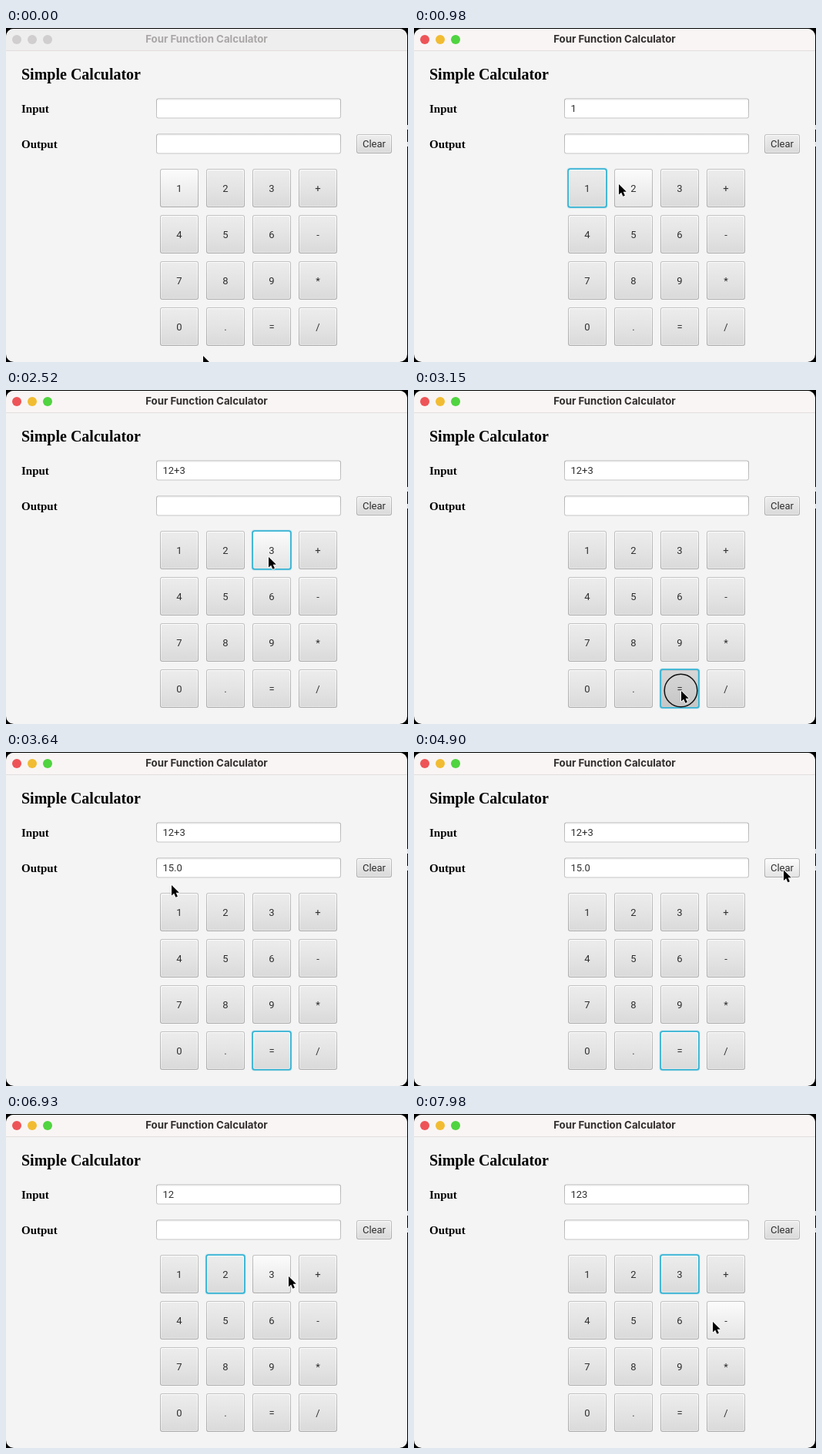
An HTML page that plays this animation: 522 by 434 pixels, repeating every 8 s.

```html
<!DOCTYPE html>
<html lang="en">
<head>
<meta charset="utf-8">
<title>Calculator</title>
<style>
  html, body { margin: 0; width: 100%; height: 100%; overflow: hidden; background: #000; }
  svg { display: block; width: 522px; height: 434px; }
  text { font: 13px Roboto, sans-serif; fill: #2f2f2f; }
  .title { font: 700 13.25px Inter, sans-serif; fill: #322e2e; }
  .serif { font: 700 15px "Liberation Serif", serif; fill: #000; }
  .heading { font-size: 20px; }
  .mid { text-anchor: middle; }
  .bar { fill: #f9f5f4; }
  .inactive .bar { fill: #efeeee; }
  .inactive .title { fill: #a9a6a6; }
  .inactive .light { fill: #d0cece; }
  .glow, .focus { fill: none; }
  .edge { fill: url(#edge); }
  .rim { fill: url(#rim); }
  .face { fill: url(#face); }
  .hover .face { fill: url(#faceHover); }
  .press .face { fill: url(#facePress); }
  .press .rim { fill: #c9c9c9; }
  .focused .glow { fill: #039ed3; fill-opacity: .12; }
  .focused .focus { fill: #35b3d3; }
</style>
</head>
<body>
<svg id="stage" viewBox="0 0 522 434">
  <defs id="defs"></defs>
  <rect width="522" height="434"/>
  <path d="M521.5 126v6m0 16v6" stroke="#ddd"/>
  <rect y="1" width="521" height="433" rx="10" fill="#f4f4f4"/>
  <path class="bar" d="M0 29V11A10 10 0 0 1 10 1H511A10 10 0 0 1 521 11V29Z"/>
  <path d="M0 29.5H521" stroke="#e2dedd"/>
  <circle class="light" cx="14" cy="15" r="6" fill="#ee5457"/>
  <circle class="light" cx="34" cy="15" r="6" fill="#f1bc32"/>
  <circle class="light" cx="54" cy="15" r="6" fill="#50d440"/>
  <text class="title mid" x="260.5" y="19">Four Function Calculator</text>
  <text class="serif heading" x="20" y="67">Simple Calculator</text>
  <text class="serif" x="20" y="109.5">Input</text>
  <text class="serif" x="20" y="155.5">Output</text>
  <g id="widgets"></g>
  <text id="input" x="203.5" y="109"></text>
  <text id="output" x="203.5" y="155"></text>
  <g id="pointer">
    <circle id="ring" cx="-.5" cy="-.5" r="21.3" fill="none" stroke="#111" stroke-width="1.5"/>
    <path d="M0 0V13.6L3.2 10.8L5.4 15.8L7.9 14.7L5.7 9.8H9.8Z" stroke="#fff" stroke-width="1.6"
      stroke-linejoin="round" paint-order="stroke"/>
  </g>
</svg>
<script>
const LOOP = 8000, STEP = 70, HOLD = 2 * STEP;
const $ = id => document.getElementById(id);

function gradient(id, ...colors) {
  const stops = colors.map((c, i) =>
    `<stop offset="${i / (colors.length - 1)}" stop-color="${c}"/>`).join('');
  return `<linearGradient id="${id}" x2="0" y2="1">${stops}</linearGradient>`;
}
$('defs').innerHTML =
  gradient('edge', '#c1c1c1', '#acacac') +
  gradient('rim', '#fdfdfd', '#e6e6e6') +
  gradient('face', '#ececec', '#e4e4e4', '#dadada') +
  gradient('faceHover', '#fbfbfb', '#f0f0f0', '#e5e5e5') +
  gradient('facePress', '#d6d6d6', '#cfcfcf', '#c6c6c6') +
  gradient('fieldEdge', '#b0b0b0', '#c6c6c6');

const buttons = [...'123+456-789*0.=/'].map((label, i) => ({
  label, x: 200 + i % 4 * 60, y: 183 + Math.floor(i / 4) * 60, w: 50, h: 50
}));
buttons.push({ label: 'Clear', x: 455, y: 138, w: 46, h: 25 });

const layer = (name, { x, y, w, h }, inset, rx) =>
  `<rect class="${name}" x="${x + inset}" y="${y + inset}" width="${w - 2 * inset}" height="${h - 2 * inset}" rx="${rx}"/>`;
const drawButton = b => '<g class="button">' +
  layer('glow', b, -1.7, 4) + layer('edge', b, 0, 3) + layer('focus', b, -.8, 3.5) +
  layer('rim', b, 1, 2) + layer('face', b, 2, 1.5) +
  `<text class="mid" x="${b.x + b.w / 2}" y="${b.y + b.h / 2 + 4.8}">${b.label}</text></g>`;
const drawField = y =>
  `<rect x="195" y="${y}" width="240" height="26" rx="3" fill="url(#fieldEdge)"/>
   <rect x="196" y="${y + 1}" width="238" height="24" rx="2" fill="#fff"/>
   <path d="M197 ${y + 1.5}h236" stroke="#ececec"/>`;
$('widgets').innerHTML = drawField(91.5) + drawField(137.5) + buttons.map(drawButton).join('');
document.querySelectorAll('.button').forEach((el, i) => buttons[i].el = el);

// The pointer aims near a button's centre, rests, then leaves for the next stop.
const stops = [], clicks = [];
function visit(label, arrive, leave, dx = 2, dy = 3) {
  const b = buttons.find(b => b.label === label);
  stops.push({ arrive, leave, x: b.x + b.w / 2 + dx, y: b.y + b.h / 2 + dy });
}
const hover = (label, time, dx, dy) => visit(label, time, time + STEP, dx, dy);
function click(label, time, dx, dy) {
  clicks.push({ label, down: time, up: time + HOLD });
  visit(label, time - STEP, time + HOLD + STEP, dx, dy);
}

hover('.', 0, -29, 38);
click('1', 630);
hover('2', 980, -19, -5);
click('2', 1260);
click('+', 1960);
click('3', 2380, -4, 9);
click('=', 3080);
hover('1', 3640, -10, -35);
hover('Clear', 4480);
click('Clear', 4970);
hover('1', 5460, 8, 16);
click('1', 6090, 8, 9);
click('2', 6510);
hover('3', 6930, 22);
click('3', 7280, 22);
hover('-', 7980, -17, 2);

function pointerAt(t) {
  const i = stops.findLastIndex(s => s.arrive <= t);
  const from = stops[i], to = stops[i + 1];
  if (!to || t <= from.leave) return from;
  const u = (t - from.leave) / (to.arrive - from.leave), k = u * u * (3 - 2 * u);
  return { x: from.x + (to.x - from.x) * k, y: from.y + (to.y - from.y) * k };
}

function stateAt(t) {
  const s = { input: '', output: '', focus: '', pressed: '' };
  for (const { label, down, up } of clicks) {
    if (t < down) break;
    s.focus = label;
    if (t < up) s.pressed = label;
    else if (label === 'Clear') s.input = s.output = '';
    else if (label === '=') s.output = '15.0';
    else s.input += label;
  }
  return s;
}

function draw(now) {
  const t = Math.floor(now % LOOP / STEP) * STEP;
  const { x, y } = pointerAt(t), s = stateAt(t), active = s.focus !== '';
  $('stage').classList.toggle('inactive', !active);
  for (const b of buttons) {
    const over = active
      ? x >= b.x && x < b.x + b.w && y >= b.y && y < b.y + b.h
      : b.label === '1';
    b.el.classList.toggle('hover', over);
    b.el.classList.toggle('press', b.label === s.pressed);
    b.el.classList.toggle('focused', b.label === s.focus);
  }
  $('input').textContent = s.input;
  $('output').textContent = s.output;
  $('ring').setAttribute('opacity', s.pressed ? 1 : 0);
  $('pointer').setAttribute('transform', `translate(${x} ${y})`);
}

let start;
function tick(now) {
  start ??= now;
  draw(now - start);
  requestAnimationFrame(tick);
}
draw(0);
requestAnimationFrame(tick);
</script>
</body>
</html>
```
